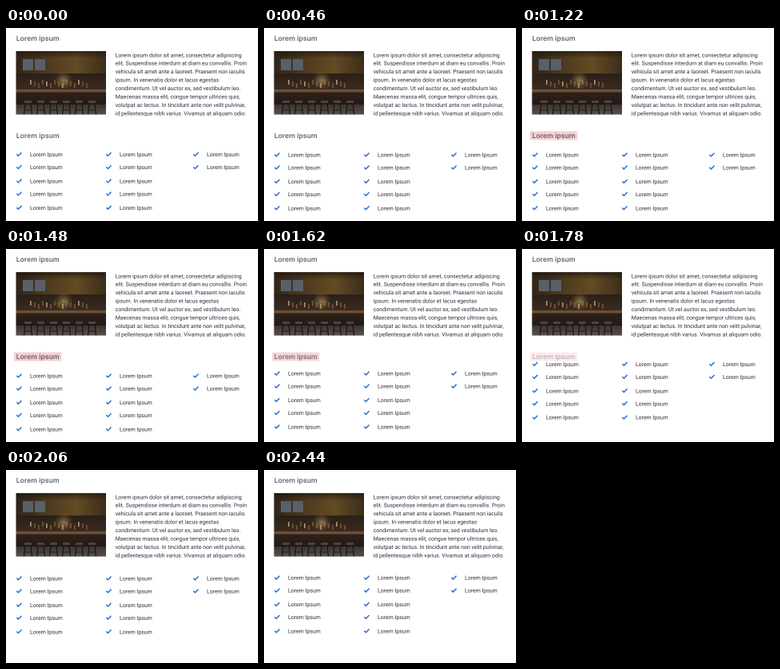
An HTML page with a canvas for the animation above (2.68 s loop, 315 px wide and 242 px high).

```html
<!DOCTYPE html>
<html lang="en">
<head>
<meta charset="utf-8">
<title>List transition</title>
<style>
  html, body { margin: 0; width: 100%; height: 100%; overflow: hidden; background: #fff; }
  canvas { display: block; width: 315px; height: 242px; }
</style>
</head>
<body>
<canvas id="stage"></canvas>
<script>
const W = 315, H = 242, LOOP = 2680, DURATION = 670;
const canvas = document.getElementById('stage');
const ctx = canvas.getContext('2d');
// Supersampled so that small text keeps its fractional position.
const ratio = 2 * (window.devicePixelRatio || 1);
canvas.width = W * ratio;
canvas.height = H * ratio;

const HEADING_FONT = '600 8.65px Inter, sans-serif';
const BODY_FONT = '6.95px Roboto, sans-serif';
const HEADING = '#66626d', INK = '#2b293a', BLUE = '#2b70d3', PINK = '#f6d0d3';
const SLIDE = 23.9;

const paragraph = [
  'Lorem ipsum dolor sit amet, consectetur adipiscing',
  'elit. Suspendisse interdum at diam eu convallis. Proin',
  'vehicula sit amet ante a laoreet. Praesent non iaculis',
  'ipsum. In venenatis dolor et lacus egestas',
  'condimentum. Ut vel auctor ex, sed vestibulum leo.',
  'Maecenas massa elit, congue tempor ultrices quis,',
  'volutpat ac lectus. In tincidunt ante non velit pulvinar,',
  'id pellentesque nibh varius. Vivamus at aliquam odio.'
];
const columns = [{ x: 13, rows: 5 }, { x: 125, rows: 5 }, { x: 234, rows: 2 }];
// Rows sit in pairs: 16 px within a pair, 33.4 px from pair to pair.
const rowOffset = i => Math.floor(i / 2) * 33.4 + (i % 2) * 16;

// The CSS "ease" curve, cubic-bezier(.25, .1, .25, 1).
function ease(t) {
  if (t <= 0) return 0;
  if (t >= 1) return 1;
  const bezier = (a, b, u) => 3 * a * u * (1 - u) ** 2 + 3 * b * u * u * (1 - u) + u ** 3;
  let low = 0, high = 1;
  for (let i = 0; i < 24; i++) {
    const mid = (low + high) / 2;
    if (bezier(0.25, 0.25, mid) < t) low = mid; else high = mid;
  }
  return bezier(0.1, 1, low);
}

const transition = (time, start) => ease((time - start) / DURATION);

function text(str, x, y, font, color) {
  ctx.font = font;
  ctx.fillStyle = color;
  ctx.fillText(str, x, y);
}

function rect(x, y, w, h, color) {
  ctx.fillStyle = color;
  ctx.fillRect(x, y, w, h);
}

function line(points, color, width) {
  ctx.beginPath();
  points.forEach(([x, y]) => ctx.lineTo(x, y));
  ctx.strokeStyle = color;
  ctx.lineWidth = width;
  ctx.stroke();
}

function gradient(x0, y0, x1, y1, ...colors) {
  const g = ctx.createLinearGradient(x0, y0, x1, y1);
  colors.forEach((color, i) => g.addColorStop(i / (colors.length - 1), color));
  return g;
}

function glow(x, y, r, color) {
  const g = ctx.createRadialGradient(x, y, 0, x, y, r);
  g.addColorStop(0, color);
  g.addColorStop(1, 'rgba(150,110,50,0)');
  rect(x - r, y - r, 2 * r, 2 * r, g);
}

function drawPhoto() {
  ctx.save();
  ctx.beginPath();
  ctx.rect(12.5, 29, 112.5, 79.5);
  ctx.clip();

  // Back wall, menu boards and shelves
  rect(12, 29, 114, 80, '#211a16');
  rect(12, 29, 114, 28, gradient(12, 0, 125, 0, '#30251a', '#4c391f', '#644b24', '#3c2d1b'));
  rect(12, 29, 114, 9, gradient(0, 29, 0, 38, 'rgba(28,21,15,.7)', 'rgba(28,21,15,0)'));
  rect(21, 39, 13, 14, '#59606a');
  rect(36, 39, 13, 14, '#59606a');
  rect(12, 57, 114, 20, gradient(0, 57, 0, 77, '#2a2019', '#3b2b1f'));
  for (let i = 0; i < 15; i++) {
    rect(30 + i * 5, 65 + (i % 3) * 2, 1.8, 6, i % 4 ? '#6d5238' : '#a48b68');
  }
  glow(72, 66, 12, 'rgba(226,190,130,.55)');

  // Counter, floor and stools
  rect(12, 77, 114, 3.5, '#6b5037');
  rect(12, 80.5, 114, 16, gradient(0, 80, 0, 97, '#302119', '#211a17'));
  rect(12, 96, 114, 13, gradient(0, 96, 0, 109, '#3b3431', '#5a514e'));
  for (let i = 0; i < 6; i++) {
    const x = 23 + i * 16;
    rect(x, 91, 9, 3, '#51433a');
    line([[x + 1, 94], [x - 0.5, 108.5]], '#171412', 1.2);
    line([[x + 8, 94], [x + 9.5, 108.5]], '#171412', 1.2);
    line([[x, 103], [x + 9, 103]], '#171412', 0.8);
  }
  ctx.restore();
}

function drawItem(x, y) {
  line([[x + 0.3, y - 2.8], [x + 2.4, y - 0.8], [x + 6.5, y - 5]], BLUE, 1.5);
  text('Lorem Ipsum', x + 17, y, BODY_FONT, INK);
}

function draw(time) {
  const collapsed = time < 1000 ? 1 - transition(time, -550) : transition(time, 1543);
  const highlight = transition(time, 450);

  ctx.setTransform(ratio, 0, 0, ratio, 0, 0);
  ctx.textRendering = 'geometricPrecision';
  rect(0, 0, W, H, '#fff');
  text('Lorem ipsum', 12.8, 16.2, HEADING_FONT, HEADING);
  drawPhoto();
  paragraph.forEach((str, i) => text(str, 136.7, 36.3 + i * 10.43, BODY_FONT, INK));

  ctx.globalAlpha = (1 - collapsed) * highlight;
  rect(10, 129.5, 59.3, 11, PINK);
  ctx.globalAlpha = 1 - collapsed;
  text('Lorem ipsum', 12.8, 138.2, HEADING_FONT, HEADING);
  ctx.globalAlpha = 1;

  for (const { x, rows } of columns) {
    for (let i = 0; i < rows; i++) drawItem(x, 161.6 + rowOffset(i) - SLIDE * collapsed);
  }
}

const begin = performance.now();
function tick() {
  draw((performance.now() - begin) % LOOP);
  requestAnimationFrame(tick);
}
tick();
</script>
</body>
</html>
```
